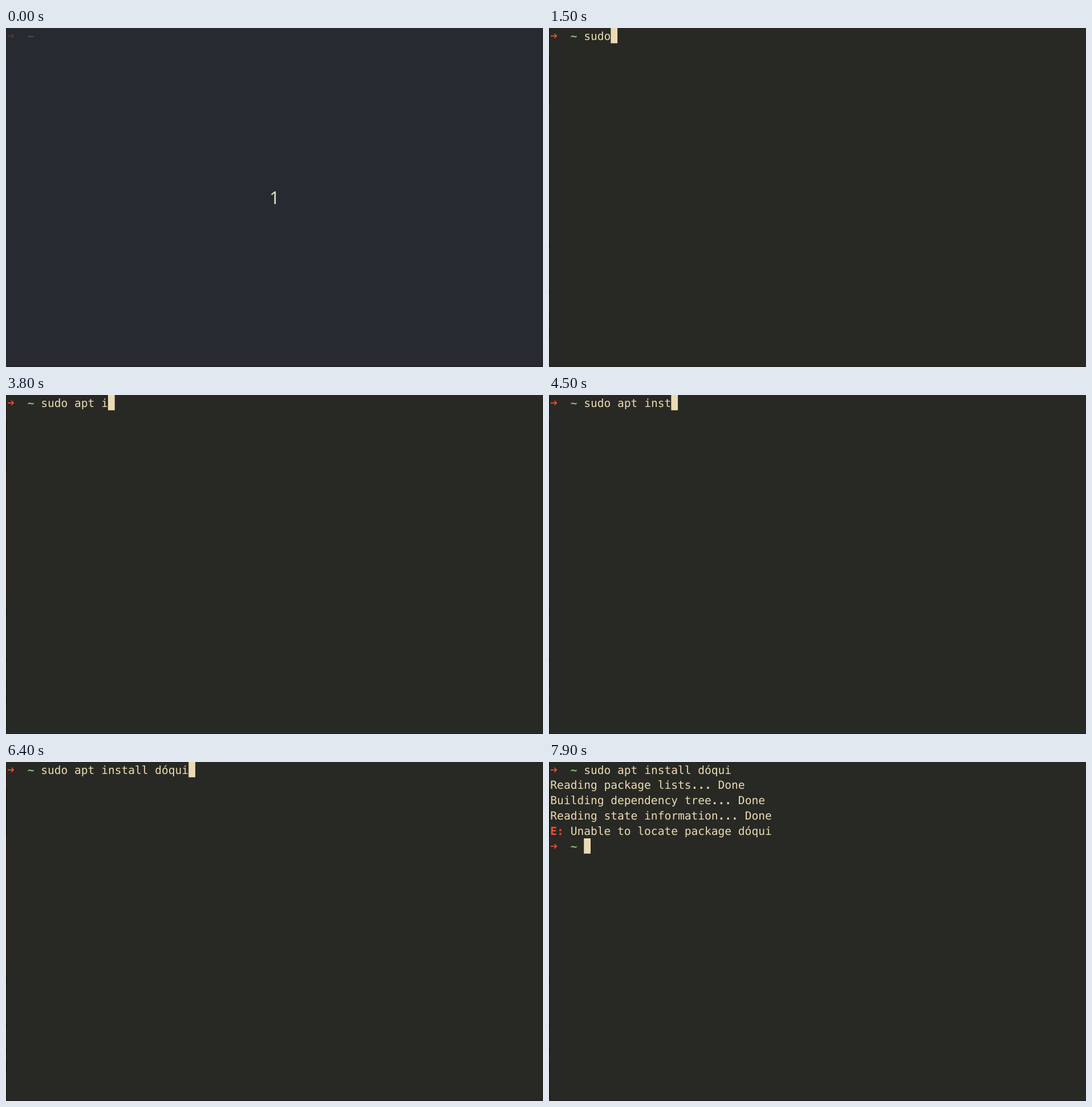
An HTML page that plays this animation: 942 by 595 pixels, repeating every 8000 ms.

```html
<!DOCTYPE html>
<html lang="en">
<head>
<meta charset="utf-8">
<title>Terminal</title>
<style>
html, body { margin: 0; width: 100%; height: 100%; overflow: hidden; background: #282924; }
svg { display: block; width: 942px; height: 595px; }
text {
  font: 19.56px "DejaVu Sans Mono", monospace;
  fill: #ebdbb2;
  white-space: pre;
  text-rendering: geometricPrecision;
  font-variant-ligatures: none;
}
.bold { font-weight: 700; }
</style>
</head>
<body>
<svg viewBox="0 0 942 595" xmlns="http://www.w3.org/2000/svg">
  <defs>
    <g id="prompt">
      <path d="M3 13.8H13M9.4 10L13.2 13.8L9.4 17.6" fill="none" stroke="#fb4934" stroke-width="1.7"/>
      <text class="bold" x="37.7" y="20.5" style="fill:#8ec07c">~</text>
    </g>
  </defs>
  <rect id="back" width="942" height="595"/>
  <g id="edge">
    <path d="M.5 0V46M.5 133V368" stroke="#30110e"/>
    <path d="M.5 46V133M.5 376V388M.5 460V468M.5 500V512M.5 525V545" stroke="#050505"/>
    <path d="M.5 368V376M.5 388V460M.5 468V500M.5 512V525M.5 545V595" stroke="#171814"/>
  </g>
  <path d="M0 594.5H942" stroke="#211b1b"/>
  <use id="first" href="#prompt"/>
  <text id="count" x="471" y="309" text-anchor="middle" style="font:31px 'Noto Sans',sans-serif;fill:#d3e6c4">1</text>
  <g id="lines"></g>
  <use id="last" href="#prompt" y="134"/>
  <rect id="cursor" width="11.775" height="26.8" fill="#ebdbb2"/>
</svg>
<script>
const LOOP = 8000, LEFT = 2.35, COL = 11.775, ROW = 26.8, BASE = 20.5;
const $ = id => document.getElementById(id);
const make = name => document.createElementNS('http://www.w3.org/2000/svg', name);

// [time, text typed at the prompt]; '<' deletes one character
const keys = [
  [1000, 's'], [1300, 'u'], [1400, 'd'], [1500, 'o'], [1600, ' '],
  [1800, 'p'], [1900, 'a'], [2100, 't'], [2200, ' '],
  [2400, '<'], [2600, '<'], [2700, '<'], [2900, '<'],
  [3100, 'a'], [3400, 'p'], [3500, 't'], [3600, ' '],
  [3800, 'i'], [4000, 'n'], [4100, 's'], [4500, 't'], [4600, 'a'],
  [4700, 'l'], [4800, 'l'], [4900, ' '],
  [5100, 'd'], [5800, 'ó'], [6300, 'qu'], [6400, 'i']
];
const output = [
  [6900, 'Reading package lists... Done'],
  [6900, 'Building dependency tree... Done'],
  [7000, 'Reading state information... Done'],
  [7000, '   Unable to locate package dóqui']
];
// intervals in which the cursor is blinked off
const blinks = [[0, 100], [700, 900], [5600, 5800], [7300, 7900]];

// the dots of an ellipsis are set in bold
function addText(row, col, str) {
  const el = make('text');
  el.setAttribute('x', LEFT + col * COL);
  el.setAttribute('y', BASE + row * ROW);
  for (const part of str.split(/(\.{3})/)) {
    const span = make('tspan');
    span.textContent = part;
    if (part === '...') span.setAttribute('class', 'bold');
    el.append(span);
  }
  $('lines').append(el);
  return el;
}

const command = addText(0, 5, '');
const rows = output.map(([at, str], i) => [at, addText(i + 1, 0, str)]);
const error = addText(4, 0, 'E:');
error.setAttribute('class', 'bold');
error.style.fill = '#fb4934';
rows.push([7000, error]);

const show = (el, on) => el.setAttribute('visibility', on ? 'visible' : 'hidden');

function typed(t) {
  let s = '';
  for (const [at, key] of keys) {
    if (at > t) break;
    s = key === '<' ? s.slice(0, -1) : s + key;
  }
  return s;
}

function cursorCell(t, length) {
  if (t < 6800) return [0, 5 + length];
  if (t < 6900) return [1, 0];
  return t < 7000 ? [3, 0] : [5, 5];
}

function draw(t) {
  const intro = t < 100;
  $('back').setAttribute('fill', intro ? '#272a31' : '#282924');
  $('edge').setAttribute('opacity', intro ? 0.2 : 1);
  $('first').setAttribute('opacity', intro ? 0.25 : 1);
  show($('count'), intro);

  const text = typed(t);
  command.textContent = text;
  for (const [at, el] of rows) show(el, t >= at);
  show($('last'), t >= 7000);

  const [row, col] = cursorCell(t, text.length);
  $('cursor').setAttribute('x', LEFT + col * COL);
  $('cursor').setAttribute('y', row * ROW);
  show($('cursor'), !blinks.some(([a, b]) => t >= a && t < b));
}

const start = performance.now();
function frame(now) {
  draw(Math.max(0, now - start) % LOOP);
  requestAnimationFrame(frame);
}
draw(0);
requestAnimationFrame(frame);
</script>
</body>
</html>
```
